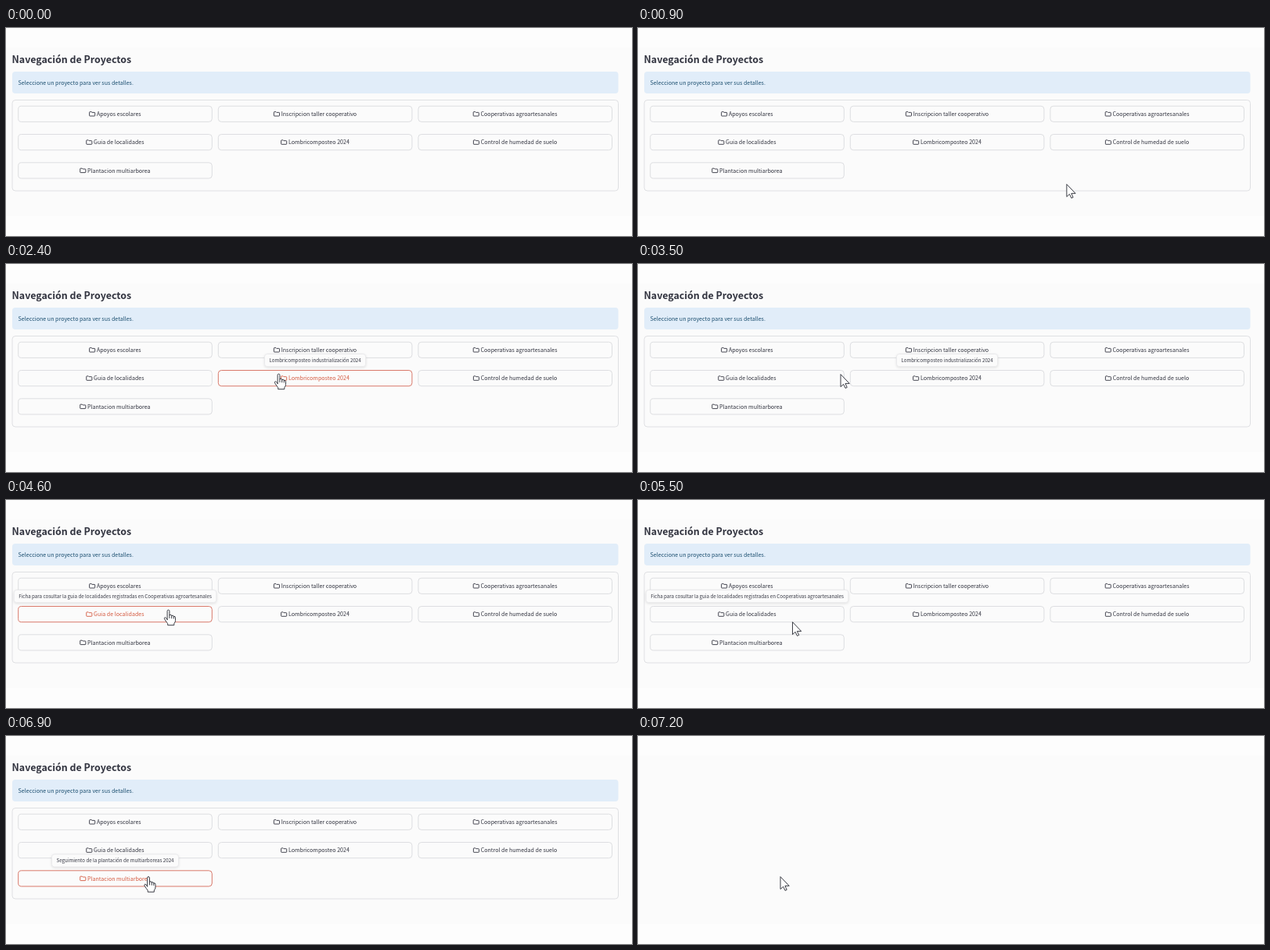
Animation, 800 px wide and 267 px high, one loop 7300 ms. Source, as an HTML page:

```html
<!DOCTYPE html>
<html lang="es">
<head>
<meta charset="utf-8">
<title>Navegación de Proyectos</title>
<style>
  html, body { margin: 0; width: 100%; height: 100%; overflow: hidden; background: #fdfdfd; }
  svg { display: block; width: 800px; height: 267px; }
  text { font: 7.1px "Noto Sans CJK JP", "Noto Sans CJK SC", "Noto Sans CJK", "Noto Sans", sans-serif; fill: #31333f; }
  .title { font-size: 12.4px; font-weight: 600; }
  .info { fill: #1c4f70; }
  .btn { stroke: #dddee1; fill: none; }
  .btn path { stroke: #31333f; stroke-width: .9; }
  .btn.hot { stroke: #d9796a; }
  .btn.hot text { fill: #d4593f; }
  .btn.hot path { stroke: #d4593f; }
  .btn text { stroke: none; }
  .tip text { font-size: 6.2px; text-anchor: middle; }
  .tip rect { fill: #fbfbfb; stroke: #e9e9eb; filter: drop-shadow(0 1px 1.5px rgba(0, 0, 0, .1)); }
  .cursor path { fill: #fff; stroke: #30323a; stroke-width: .95; stroke-linejoin: round; stroke-linecap: round; }
</style>
</head>
<body>
<svg id="stage" viewBox="0 0 800 267"></svg>
<script>
const LOOP = 7300, STEP = 100;
const stage = document.getElementById('stage');

function add(parent, tag, attrs = {}, text = '') {
  const el = document.createElementNS('http://www.w3.org/2000/svg', tag);
  for (const key in attrs) el.setAttribute(key, attrs[key]);
  el.textContent = text;
  return parent.appendChild(el);
}

const show = (el, on) => el.setAttribute('visibility', on ? 'visible' : 'hidden');

const LABELS = [
  'Apoyos escolares', 'Inscripcion taller cooperativo', 'Cooperativas agroartesanales',
  'Guia de localidades', 'Lombricomposteo 2024', 'Control de humedad de suelo',
  'Plantacion multiarborea'
];

// button index, hover from/to, tooltip from/to, tooltip text
const HOVERS = [
  [4, 2100, 3500, 2300, 3600, 'Lombricomposteo industrialización 2024'],
  [3, 3600, 5500, 3700, 5600, 'Ficha para cosultar la guia de localidades registradas en Cooperativas agroartesanales'],
  [6, 5700, 7200, 5900, 7200, 'Seguimiento de la plantación de multiarboreas 2024']
];

// time, x, y of the pointer tip
const PATH = [
  [500, 788, 224], [1200, 392, 186], [1400, 392, 186], [1700, 345, 173],
  [1900, 345, 173], [2400, 348.5, 141.5], [2700, 348.5, 141.5],
  [3500, 259, 142], [4200, 207.5, 141.5], [5200, 207.5, 141.5],
  [5900, 182, 181], [7300, 182, 181]
];

add(stage, 'rect', { y: 25, width: 800, height: 216, fill: '#fbfbfb' });
const page = add(stage, 'g');
add(page, 'text', { x: 7.6, y: 44.6, class: 'title' }, 'Navegación de Proyectos');
add(page, 'rect', { x: 8, y: 56, width: 774.5, height: 28, rx: 4, fill: '#e1edf9' });
add(page, 'text', { x: 15.6, y: 73, class: 'info' }, 'Seleccione un proyecto para ver sus detalles.');
add(page, 'rect', { x: 8, y: 92.5, width: 774.5, height: 116.5, rx: 4, fill: 'none', stroke: '#dfe0e3' });

const centerX = i => 139.5 + (i % 3) * 255.6;
const rowY = i => 100.2 + Math.floor(i / 3) * 36.3;

const buttons = LABELS.map((label, i) => {
  const g = add(page, 'g', { class: 'btn' });
  add(g, 'rect', { x: centerX(i) - 123.8, y: rowY(i), width: 247.6, height: 20.2, rx: 4 });
  const text = add(g, 'text', { y: rowY(i) + 12.9 }, label);
  const left = centerX(i) - (text.getComputedTextLength() + 9.6) / 2;
  text.setAttribute('x', left + 9.6);
  add(g, 'path', {
    d: 'M.9 .5h2l.8.8h3q.7 0 .7.7v3.3q0 .6-.7.6h-5.8q-.6 0-.6-.6v-4.1q0-.7.6-.7z',
    transform: `translate(${left} ${rowY(i) + 6.9})`
  });
  return g;
});

const tips = HOVERS.map(([i, , , , , label]) => {
  const g = add(page, 'g', { class: 'tip' });
  const box = add(g, 'rect', { y: rowY(i) - 21, height: 16.2, rx: 3.5 });
  const text = add(g, 'text', { x: centerX(i), y: rowY(i) - 10.9 }, label);
  const width = text.getComputedTextLength() + 12;
  box.setAttribute('x', centerX(i) - width / 2);
  box.setAttribute('width', width);
  return g;
});

const cursor = add(stage, 'g', { class: 'cursor' });
const arrow = add(cursor, 'path', { d: 'M0 0V15.6L3.6 12.3 6 17.4 8.2 16.4 5.9 11.4H10.8Z' });
const hand = add(cursor, 'g');
add(hand, 'path', {
  d: 'M-1.4 12V1.2Q-1.4-.4 0-.4T1.4 1.2V6.2Q3.8 4.8 4.2 7 6.4 5.9 6.8 7.9 9 7.3 9 9.6V13Q9 15.5 7.3 17V19.2H-.8V17.2Q-2.6 15-5 11.2-5.6 9.6-4.3 9.2-3 9-1.4 12Z'
});
add(hand, 'path', { d: 'M1.4 6.2V10M4.2 7V10.3M6.8 7.9V10.6', style: 'fill:none' });

function pointer(t) {
  const n = Math.max(1, PATH.findIndex(p => p[0] > t));
  const [t0, x0, y0] = PATH[n - 1], [t1, x1, y1] = PATH[n];
  const k = (t - t0) / (t1 - t0), e = k * k * (3 - 2 * k);
  return [x0 + (x1 - x0) * e, y0 + (y1 - y0) * e];
}

function draw(t) {
  const inside = (from, to) => t >= from && t < to;
  let over = false;
  HOVERS.forEach(([i, from, to, tipFrom, tipTo], n) => {
    const hot = inside(from, to);
    over = over || hot;
    buttons[i].classList.toggle('hot', hot);
    show(tips[n], inside(tipFrom, tipTo));
  });
  page.style.display = t < 7200 ? '' : 'none';
  cursor.style.display = t < 500 ? 'none' : '';
  show(arrow, !over);
  show(hand, over);
  if (t >= 500) cursor.setAttribute('transform', `translate(${pointer(t)})`);
}

const start = performance.now();
function tick() {
  const t = (performance.now() - start) % LOOP;
  draw(Math.floor(t / STEP) * STEP);
  requestAnimationFrame(tick);
}
tick();
</script>
</body>
</html>
```
